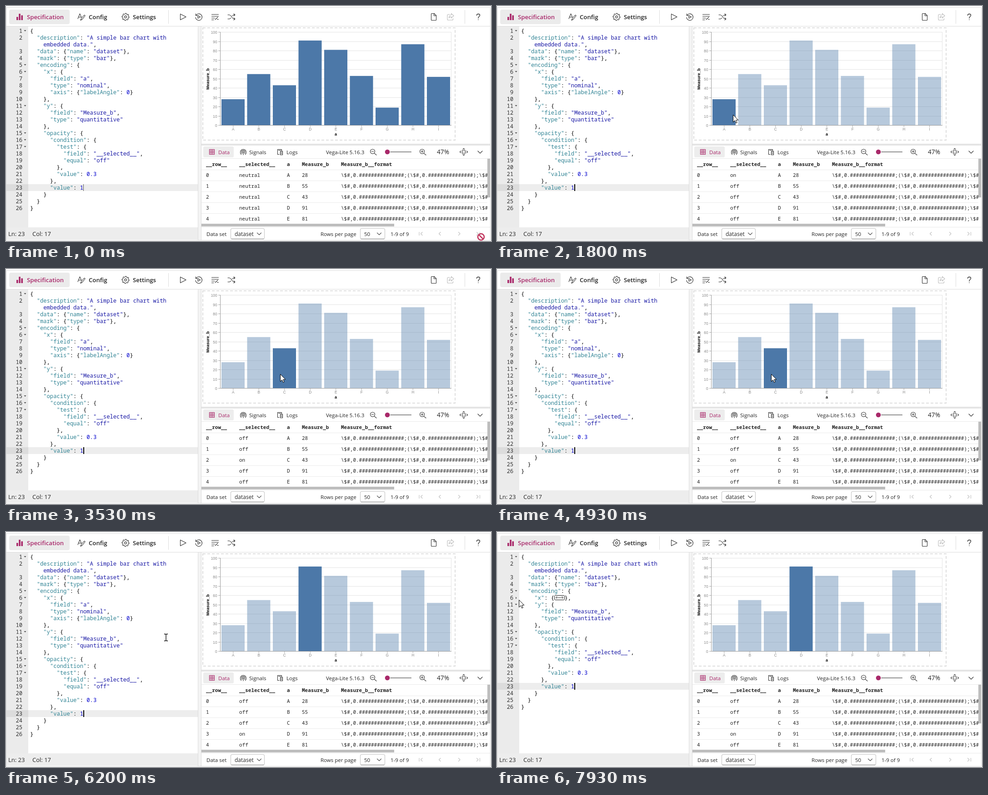
An HTML page that plays this animation: 1067 px wide and 517 px high, repeating every 8000 ms.

```html
<!DOCTYPE html>
<html lang="en">
<head>
<meta charset="utf-8">
<title>Chart specification editor</title>
<style>
html, body { margin: 0; width: 100%; height: 100%; overflow: hidden; background: #fff; }
svg { display: block; }
text { white-space: pre; fill: #242424; font: 11.5px "Open Sans", "Noto Sans", sans-serif; }
.menu text { font-size: 13.2px; font-weight: 600; }
.status text { font-size: 13px; }
.code text { font: 12.2px "Noto Sans Mono", "DejaVu Sans Mono", monospace; fill: #000; }
.code .number { fill: #333; text-anchor: end; }
.key { fill: #318495; }
.str { fill: #1a1aa6; }
.num { fill: #0000cd; }
.table text { font: 11px "Noto Sans Mono", "DejaVu Sans Mono", monospace; }
.table .head text { font-weight: 700; }
.chart text { font: 8.3px "Liberation Sans", Arial, sans-serif; fill: #888; text-anchor: middle; }
.chart .title { font-size: 9px; font-weight: 700; fill: #000; }
.icon { fill: none; stroke: #333; stroke-width: 1.1; stroke-linecap: round; stroke-linejoin: round; }
.accent { fill: #a9296a; }
</style>
</head>
<body>
<svg id="stage" width="1067" height="517" viewBox="0 0 1067 517">
  <!-- frame and panes -->
  <path fill="#ebebeb" d="M1 45H49V487H1Z"/>
  <path fill="#ededed" d="M1 487H422V514H1Z"/>
  <path fill="#f3f3f3" d="M423 45H430V515H423Z"/>
  <path fill="#e5e5e5" d="M430 303H1065V307H430Z"/>
  <path fill="none" stroke="#dcdcdc" d="M.5 515.5V3.5H1065.5V515.5ZM0 44.5H1065M422.5 45V515M429.5 45V515M357.5 9V39M1009.5 9V39"/>

  <g class="menu">
    <rect x="7" y="8" width="133" height="32" rx="4" fill="#ebebeb"/>
    <path class="accent" d="M23 24h3.6v7H23ZM28.2 17h3.6v14h-3.6ZM33.4 20.5H37V31h-3.6Z"/>
    <text class="accent" x="46" y="28.8">Specification</text>
    <text x="182" y="28.8">Config</text>
    <text x="279" y="28.8">Settings</text>
  </g>
  <g class="icon">
    <path d="M158 28L162.5 17L166 25M160 24.5H165M164 31.5L165.5 27.5L171.5 20.5Q173.5 19 174 21.5L168 29Z"/>
    <circle cx="263" cy="24" r="2.4"/>
    <path id="gear"/>
    <path d="M383.500 17.500V30.500L396 24Z"/>
    <path d="M417.500 17V21H421.500M417.800 21A7.200 7.200 0 1 1 417 25M422 21V27L427.500 24Z"/>
    <path d="M452.500 18.500H467.500M452.500 22.500H467.500M452.500 26.500H459M452.500 30.500H457M460 30L466 24.500M464.500 29.500H467.500"/>
    <path d="M488 19.500H491Q493 19.500 495 22L498 26Q500 28.500 502 28.500H503.500M488 28.500H491Q493 28.500 494.500 26.500M497.500 22Q499.500 19.500 501.500 19.500H503.500M501 17L503.800 19.500L501 22M501 26L503.800 28.500L501 31"/>
    <path d="M935.500 17.500Q935.500 16.500 936.500 16.500H942L946.500 21V30.500Q946.500 31.500 945.500 31.500H936.500Q935.500 31.500 935.500 30.500ZM941.500 16.500V21.500H946.500"/>
    <path stroke="#bbb" d="M976 18.500H973Q971 18.500 971 20.500V29Q971 31 973 31H981.500Q983.500 31 983.500 29V27.500M979.500 16.500L985 21.500L979.500 26.500V23.500Q976 23.500 974.500 26.500Q975 20 979.500 19.500Z"/>
    <path stroke-width="1.400" d="M1035.500 20.500Q1035.800 17.500 1039 17.500Q1042.500 17.500 1042.500 20.500Q1042.500 22 1040.500 23.500Q1039 24.800 1039 26.800M1039 30V30.300"/>
  </g>

  <g class="code">
    <g id="head"></g>
    <g id="foldable"></g>
    <g id="tail">
      <path fill="#dcdcdc" d="M1 392H49V407H1Z"/>
      <path fill="#ededed" d="M49 392H422V407H49Z"/>
      <rect id="caret" x="170" y="392" height="15"/>
    </g>
    <g id="placeholder">
      <rect x="126.500" y="139.500" width="22" height="10" rx="2" fill="#f4f4f4" stroke="#222"/>
      <path class="icon" stroke="#888" stroke-width="1" d="M132 142.500L129.500 144.500L132 146.500M143 142.500L145.500 144.500L143 146.500M133 144.500H142" stroke-dasharray="2 1.500"/>
      <text x="148.500" y="149">},</text>
    </g>
    <rect id="foldHover" x="37.500" y="137.500" width="10" height="14" rx="2" fill="#fff" fill-opacity=".2" stroke="#000" stroke-opacity=".3"/>
  </g>
  <g class="status">
    <text x="5" y="506">Ln: 23</text>
    <text x="58" y="506">Col: 17</text>
  </g>

  <g class="chart" id="chart">
    <rect x="433" y="48" width="555" height="247" fill="none" stroke="#dedede" stroke-width="2" stroke-dasharray="6 4"/>
    <text class="title" transform="translate(447 160.500) rotate(-90)">Measure_b</text>
    <text class="title" x="725.500" y="285">a</text>
  </g>

  <!-- debug pane toolbar -->
  <rect x="434" y="309" width="67" height="24" rx="3" fill="#ededed"/>
  <text class="accent" x="467" y="325.700">Data</text>
  <text x="535" y="325.700">Signals</text>
  <text x="617" y="325.700">Logs</text>
  <text x="704" y="325.700">Vega-Lite 5.16.3</text>
  <text x="948" y="326" style="font-size:13.700px">47%</text>
  <g class="icon">
    <path stroke="#a9296a" d="M447.500 315.500H458.500V326.500H447.500ZM451.200 315.500V326.500M454.800 315.500V326.500M447.500 319.200H458.500M447.500 322.800H458.500"/>
    <path d="M517.500 326.500A6.500 6.500 0 1 1 526.500 326.500M519.300 324.300A3.900 3.900 0 1 1 524.700 324.300M520.500 321.500A1.500 1.500 0 1 1 523.500 321.500A1.500 1.500 0 1 1 520.500 321.500M522 323V327.500"/>
    <path d="M606.500 318.500V315.500H597.500V326.500H601M599.500 317.500H604.500M603.500 319.500H608.500V327.500H603.500ZM605 322H607M605 324.500H607"/>
    <path d="M811.500 320A5 5 0 1 1 801.500 320A5 5 0 1 1 811.500 320M810 323.700L815 328M804 320H809M920.500 320A5 5 0 1 1 910.500 320A5 5 0 1 1 920.500 320M919 323.700L924 328M913 320H918M915.500 317.500V322.500"/>
    <path stroke="#222" d="M846 321H891.500"/>
    <path d="M1003.500 318H1010.500V324H1003.500ZM1005 315.500L1007 313.500L1009 315.500M1005 326.500L1007 328.500L1009 326.500M1000.500 319L998.500 321L1000.500 323M1013.500 319L1015.500 321L1013.500 323M1038 319L1043 324L1048 319"/>
  </g>
  <circle class="accent" cx="839" cy="321" r="5.300"/>

  <clipPath id="tableClip"><path d="M430 336H1059V478H430Z"/></clipPath>
  <g class="table" id="table" clip-path="url(#tableClip)"></g>
  <path fill="#bdbdbd" d="M1059 336H1065V421H1059ZM430 479H854V485H430Z"/>
  <path stroke="#e8e8e8" d="M430 335.500H1065M430 486.500H1065"/>

  <!-- paging -->
  <text x="441" y="505.500">Data set</text>
  <text x="503" y="505.500" style="font-size:12px">dataset</text>
  <text x="692" y="505.500">Rows per page</text>
  <text x="788" y="505.500">50</text>
  <text x="846" y="505.500">1-9 of 9</text>
  <g class="icon">
    <rect x="494.500" y="489.500" width="74" height="23" rx="3" stroke="#c4c4c4"/>
    <rect x="779.500" y="489.500" width="54" height="23" rx="3" stroke="#c4c4c4"/>
    <path stroke="#777" stroke-width="1" d="M496.500 512.500H566.500M781.500 512.500H831.500"/>
    <path stroke="#555" d="M552.500 499L557 503.500L561.500 499M816.500 499L821 503.500L825.500 499"/>
    <path stroke="#c0c0c0" d="M909 497.500V504.500M916 497.500L912.500 501L916 504.500M956 497.500L952.500 501L956 504.500M995.500 497.500L999 501L995.500 504.500M1035.500 497.500L1039 501L1035.500 504.500M1042.500 497.500V504.500"/>
  </g>

  <g id="pointer">
    <path id="arrow" fill="#fff" stroke="#000" d="M.5.500V16.500L4.200 13L6.700 18.500L9.200 17.400L6.800 12H11.800Z"/>
    <path id="beam" fill="none" stroke="#000" stroke-width="1.300" d="M-4-7.500H-1.500L0-6.500L1.500-7.500H4M0-6.500V6.500M-4 7.500H-1.500L0 6.500L1.500 7.500H4"/>
    <path id="hand" fill="#fff" stroke="#000" stroke-linejoin="round" d="M-1.500 13V1Q-1.500-.5 0-.5Q1.500-.5 1.500 1V7Q3 5.500 4.500 7.500Q6 6.500 7.500 8Q9.500 7.500 10 9.500V14Q9.500 17 8.500 20.500H0Q-1.500 17-5 13Q-6 10.500-4 10.500Z"/>
    <path id="blocked" fill="none" stroke="#c0345c" stroke-width="2.600" d="M7 0A7 7 0 1 1-7 0A7 7 0 1 1 7 0M-5-5L5 5"/>
  </g>
</svg>

<script>
const $ = id => document.getElementById(id);
const add = (id, markup) => $(id).insertAdjacentHTML('beforeend', markup);
const text = (x, y, content, attrs = '') => `<text x="${x}" y="${y}" ${attrs}>${content}</text>`;
const line = (d, color) => `<path fill="none" stroke="${color}" d="${d}"/>`;
const show = (id, on) => $(id).setAttribute('visibility', on ? 'visible' : 'hidden');

// Settings gear
$('gear').setAttribute('d', Array.from({ length: 33 }, (_, i) => {
  const a = i / 32 * 2 * Math.PI, r = i % 4 < 2 ? 8 : 6.2;
  return `${i ? 'L' : 'M'}${263 + r * Math.cos(a)} ${24 + r * Math.sin(a)}`;
}).join('') + 'Z');

// Code editor
const source = `{
  "description": "A simple bar chart with
    embedded data.",
  "data": {"name": "dataset"},
  "mark": {"type": "bar"},
  "encoding": {
    "x": {
      "field": "a",
      "type": "nominal",
      "axis": {"labelAngle": 0}
    },
    "y": {
      "field": "Measure_b",
      "type": "quantitative"
    },
    "opacity": {
      "condition": {
        "test": {
          "field": "__selected__",
          "equal": "off"
        },
        "value": 0.3
      },
      "value": 1
    }
  }
}`;
const WRAPPED_ROW = 2, FOLD_ROW = 6, FOLD_END = 10, LINE_HEIGHT = 15;
const highlight = code => code.replace(/("[^"]*"(?=:))|("[^"]*"?|embedded.*")|(\d[\d.]*)/g,
  (token, key, str) => `<tspan class="${key ? 'key' : str ? 'str' : 'num'}">${token}</tspan>`);

source.split('\n').forEach((code, row) => {
  const y = 59 + row * LINE_HEIGHT;
  const group = row <= FOLD_ROW ? 'head' : row <= FOLD_END ? 'foldable' : 'tail';
  let markup = text(53, y, highlight(code));
  if (row !== WRAPPED_ROW) markup += text(36, y, row < WRAPPED_ROW ? row + 1 : row, 'class="number"');
  if (code.endsWith('{')) markup += `<path id="fold${row}" fill="#555" d="M39.500 ${y - 6}h5l-2.500 3Z"/>`;
  add(group, markup);
});
$('tail').append($('caret'));

// Bar chart
const values = [28, 55, 43, 91, 81, 53, 19, 87, 52];
const BASE = 262.5, UNIT = 2.05, STEP = 56.5, LEFT = 471.5;
for (let v = 0; v <= 100; v += 10) {
  const y = Math.round(BASE - v * UNIT - .5) + .5;
  add('chart', line(`M${LEFT} ${y}H980`, '#e4e4e4') + line(`M467 ${y}H${LEFT}`, '#aaa')
    + text(464.500, y + 3, v, 'style="text-anchor:end"'));
}
add('chart', line('M979.500 57V262', '#e4e4e4'));
values.forEach((v, i) => {
  const x = LEFT + i * STEP, mid = x + STEP / 2;
  add('chart', `<rect id="bar${i}" x="${x + 2.5}" y="${BASE - v * UNIT}" width="51" height="${v * UNIT}" fill="#4c78a8"/>`
    + line(`M${mid} 262V267`, '#aaa') + text(mid, 274, 'ABCDEFGHI'[i]));
});
add('chart', line(`M${LEFT} 57V262.500H980`, '#999'));

// Data table
const columns = [440, 513, 618, 651, 737];
const cells = (y, items) => items.map((item, i) => text(columns[i], y, item)).join('');
const format = '\\$#,0.' + '#'.repeat(15);
const ROWS = 5;
add('table', `<g class="head">${cells(352, ['__row__', '__selected__', 'a', 'Measure_b', 'Measure_b__format'])}</g>`);
for (let i = 0; i < ROWS; i++) {
  const y = 376 + i * 24;
  add('table', line(`M430 ${y - 15.5}H1059`, '#ececec')
    + cells(y, [i, `<tspan id="state${i}"></tspan>`, 'ABCDE'[i], values[i], `${format};(${format});${format}`]));
}

// Timeline
const DURATION = 8000, FOLD_TIME = 7670;
const selectTimes = [1600, 2270, 3500, 5830];
const path = [
  [0, 1046, 508], [730, 513, 252], [870, 526, 247], [1130, 513, 241], [1530, 513, 241],
  [1800, 519, 239], [2200, 556, 235], [2530, 556, 235], [2930, 593, 232], [3200, 603, 231],
  [4930, 603, 231], [5530, 668, 232], [5870, 668, 232], [6200, 353, 232], [6600, 43, 144],
  [7800, 43, 144], [7930, 48, 149], [DURATION, 48, 149]
];

function pointerAt(t) {
  const next = path.findIndex(key => key[0] > t);
  const [t0, x0, y0] = path[next - 1], [t1, x1, y1] = path[next];
  const k = (t - t0) / (t1 - t0);
  return [x0 + (x1 - x0) * k, y0 + (y1 - y0) * k];
}

function caretVisible(t) {
  if (t < 1530 || t >= FOLD_TIME) return true;
  return (t - (t < 6130 ? 1530 : 6130)) % 1000 < 600;
}

function render(t) {
  const selected = selectTimes.filter(time => t >= time).length - 1;
  values.forEach((_, i) => $('bar' + i).setAttribute('fill-opacity', selected < 0 || i === selected ? 1 : .4));
  for (let i = 0; i < ROWS; i++) {
    $('state' + i).textContent = selected < 0 ? 'neutral' : i === selected ? 'on' : 'off';
  }

  const folded = t >= FOLD_TIME;
  show('foldable', !folded);
  show('placeholder', folded);
  $('tail').setAttribute('transform', `translate(0 ${folded ? (FOLD_ROW - FOLD_END) * LINE_HEIGHT : 0})`);
  $('fold' + FOLD_ROW).setAttribute('d', folded ? 'M41 142.500v5l2.500-2.500Z' : 'M39.500 143h5l-2.500 3Z');

  const focused = t >= 1530;
  show('caret', caretVisible(t));
  $('caret').setAttribute('width', focused ? 2 : 1);
  $('caret').setAttribute('fill', focused ? '#000' : '#555');

  const [x, y] = pointerAt(t);
  const onFold = t >= 6600 && t < 7870;
  const kind = t < 70 ? 'blocked' : onFold ? 'hand' : x > 49 && x < 422 ? 'beam' : 'arrow';
  for (const id of ['arrow', 'beam', 'hand', 'blocked']) show(id, id === kind);
  $('pointer').setAttribute('transform', `translate(${Math.round(x)} ${Math.round(y)})`);
  show('foldHover', onFold);
}

const start = performance.now();
function tick() {
  render((performance.now() - start) % DURATION);
  requestAnimationFrame(tick);
}
tick();
</script>
</body>
</html>
```
